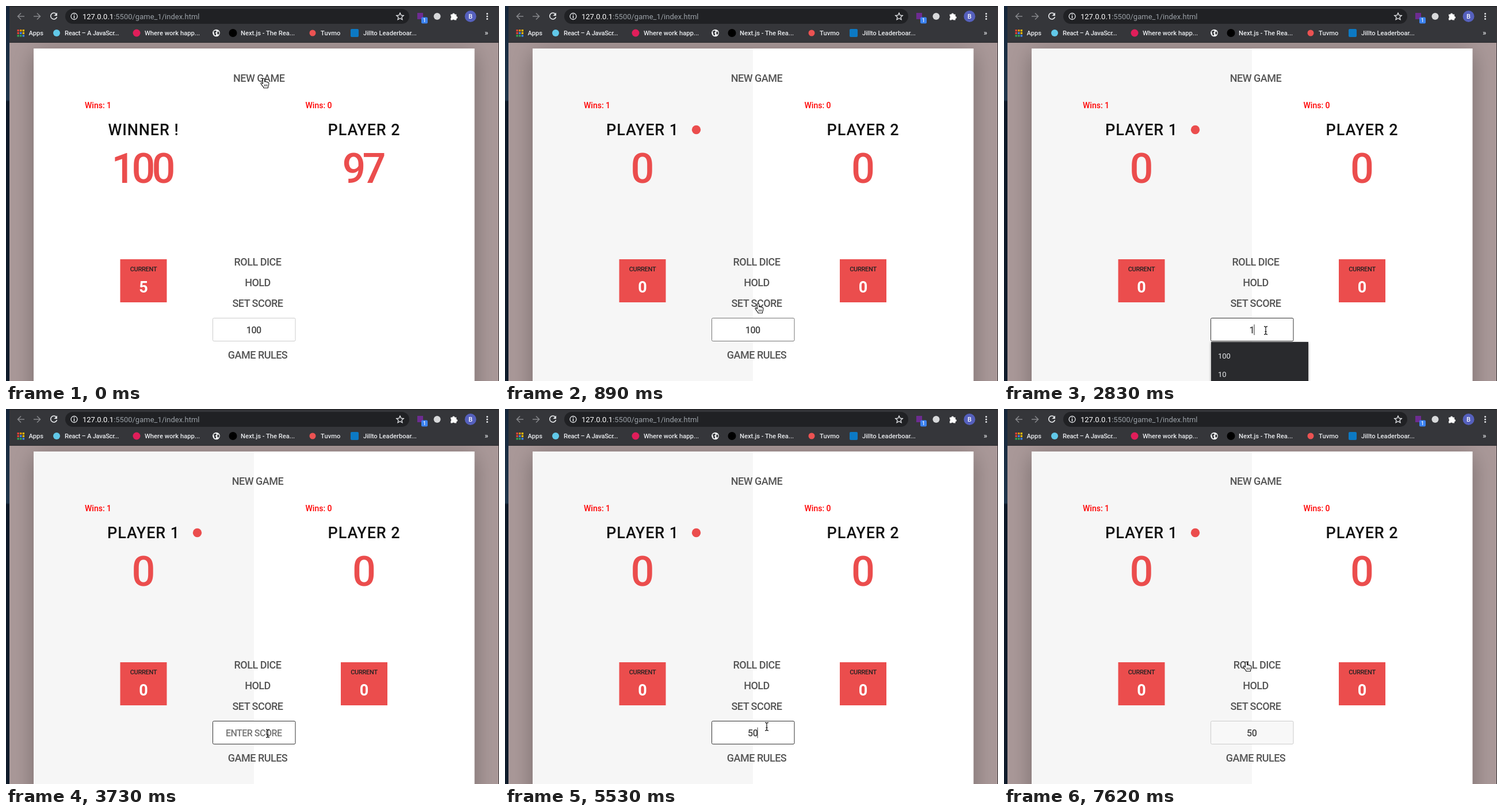
Write an HTML page that moves like this. It is 857x653 px and loops after 8 s.

```html
<!DOCTYPE html>
<html lang="en">
<head>
<meta charset="utf-8">
<title>Dice game</title>
<style>
  html, body { margin: 0; width: 100%; height: 100%; overflow: hidden; }
  svg { display: block; font-family: Roboto, Arial, sans-serif; }
  .card { fill: #fff; filter: drop-shadow(0 8px 19px rgba(0, 0, 0, .3)); }
  .mid, .btn, .name, .score, .label, .cur, #value { text-anchor: middle; font-weight: 500; }
  .btn { font-size: 18px; letter-spacing: -.5px; fill: #555; }
  .wins { font-size: 14px; font-weight: 500; fill: #f00; }
  .name { font-size: 27px; letter-spacing: .9px; fill: #111; }
  .score { font-size: 72px; letter-spacing: -6px; fill: #eb4d4d; }
  .label { font-size: 11px; letter-spacing: -.3px; fill: #222; }
  .cur { font-size: 27px; font-weight: 700; fill: #fff; }
  .red { fill: #eb4d4d; }
  #value { font-size: 16px; letter-spacing: -.5px; }
  .marks { font-size: 11.2px; font-weight: 500; fill: #e8eaed; }
  .line { fill: none; stroke: #e8eaed; stroke-width: 1.6; }
  .thin { stroke-width: 1.3; }
  .dim { stroke: #85868a; }
  .item { font-size: 13px; fill: #e8eaed; }
</style>
</head>
<body>
<svg width="857" height="653" viewBox="0 0 857 653">
  <defs>
    <linearGradient id="desk" x2="0" y2="1">
      <stop offset="0" stop-color="#15263a"/>
      <stop offset=".25" stop-color="#20364c"/>
      <stop offset=".255" stop-color="#0d1827"/>
      <stop offset="1" stop-color="#101c2b"/>
    </linearGradient>
  </defs>

  <!-- page -->
  <rect width="857" height="653" fill="#aa9999"/>
  <rect class="card" x="48" y="74" width="766.5" height="640"/>
  <rect id="active" x="48" y="74" width="383" height="579" fill="#f6f6f6"/>

  <!-- browser -->
  <rect width="857" height="64" fill="#35363a"/>
  <path d="M6 0H857V1.5H6z" fill="#222326"/>
  <path d="M6 63.5H857" stroke="#2a2a2d"/>
  <rect width="6" height="653" fill="url(#desk)"/>
  <path d="M856.5 0V653" stroke="#3a3538"/>
  <rect x="103" y="5" width="598" height="26" rx="13" fill="#202124"/>
  <path class="line dim" d="M32 18H20.5M26 12.5L20.5 18L26 23.5M48 18H59.5M54 12.5L59.5 18L54 23.5"/>
  <path class="line" d="M87.5 14A5.5 5.5 0 1 0 88.5 19"/>
  <path d="M89 11.5V17H83.5z" fill="#e8eaed"/>
  <circle class="line thin" cx="118.5" cy="18" r="5.5"/>
  <path class="line" d="M118.5 17V21.5M118.5 14.5V16"/>
  <text x="133" y="22.5" font-size="13" fill="#fff">127.0.0.1<tspan fill="#9aa0a6">:5500/game_1/index.html</tspan></text>
  <path class="line thin" d="M685 12l1.8 4.1 4.4.4-3.3 2.9 1 4.3-3.9-2.3-3.9 2.3 1-4.3-3.3-2.9 4.4-.4z"/>
  <rect x="715" y="12" width="10" height="11" fill="#6d2c91"/>
  <rect x="722" y="19.5" width="11" height="11" rx="2" fill="#3b82f0"/>
  <text class="mid" x="727.5" y="28.3" font-size="8.5" fill="#fff">1</text>
  <circle cx="749.5" cy="18" r="6" fill="#d8d9db"/>
  <path fill="#fff" d="M773 14.5h3a2 2 0 1 1 4 0h3v3.5a2 2 0 1 1 0 4v2.5h-3.5a2 2 0 0 0-3.5 0h-3v-3.5a2 2 0 0 0 0-3.5z"/>
  <circle cx="807.5" cy="18" r="10" fill="#5560bd"/>
  <text class="mid" x="807.5" y="22" font-size="11" fill="#fff">B</text>
  <path stroke="#e8eaed" stroke-width="3" stroke-linecap="round" d="M836.5 13.5v0M836.5 18v0M836.5 22.5v0"/>

  <g id="apps"></g>
  <circle cx="88" cy="47" r="6" fill="#61c8e8"/>
  <circle cx="227" cy="47" r="6.5" fill="#e01e5a"/>
  <circle cx="365.5" cy="47" r="6.3" fill="#f1f3f4"/>
  <path fill="#35363a" d="M361 44l4-1.5 1 2-2.5 2.5 2 1.5-1 3-2-1zM368 44l2.5 1.5v3l-2 1.5-1.5-2.5z"/>
  <circle cx="394.5" cy="47" r="7" fill="#000"/>
  <circle cx="533" cy="47" r="5.5" fill="#ec5252"/>
  <rect x="599" y="40" width="14" height="14" rx="2" fill="#0c79c4"/>
  <g class="marks">
    <text x="39.5" y="51">Apps</text>
    <text x="102" y="51" letter-spacing="-.3">React – A JavaScr...</text>
    <text x="241" y="51">Where work happ...</text>
    <text x="408" y="51">Next.js - The Rea...</text>
    <text x="547" y="51">Tuvmo</text>
    <text x="621" y="51">Jillto Leaderboar...</text>
    <text x="832" y="51" font-size="13">»</text>
  </g>

  <!-- players -->
  <text class="wins" x="137" y="178">Wins: 1</text>
  <text class="wins" x="520.5" y="178">Wins: 0</text>
  <text class="name" id="name1" x="239" y="224.5"></text>
  <text class="name" x="622.5" y="224.5">PLAYER 2</text>
  <circle class="red" id="dot" cx="332.5" cy="215.5" r="7.7"/>
  <text class="score" id="score1" x="236" y="307.5"></text>
  <text class="score" id="score2" x="619.5" y="307.5"></text>
  <g>
    <path class="red" d="M198.5 441h81v75h-81z"/>
    <text class="label" x="239" y="462">CURRENT</text>
    <text class="cur" id="cur1" x="239" y="498.5"></text>
  </g>
  <g id="box2">
    <path class="red" d="M582 441h81v75h-81z"/>
    <text class="label" x="622.5" y="462">CURRENT</text>
    <text class="cur" x="622.5" y="498.5">0</text>
  </g>

  <!-- controls -->
  <text class="btn" id="newGame" x="437.5" y="131.5">NEW GAME</text>
  <text class="btn" id="roll" x="437.5" y="452">ROLL DICE</text>
  <text class="btn" x="437.5" y="488">HOLD</text>
  <text class="btn" id="setScore" x="437.5" y="524">SET SCORE</text>
  <text class="btn" x="437.5" y="614">GAME RULES</text>
  <rect id="field" x="359.5" y="543.5" width="143.5" height="40" rx="2"/>
  <text id="value" x="430.7" y="569.5"></text>
  <path id="caret" d="M.5 554.5V573" stroke="#333"/>
  <g id="popup" style="filter:drop-shadow(0 1px 2px rgba(0,0,0,.4))">
    <rect id="list" x="360" y="585" width="169" fill="#292a2d"/>
    <text class="item" id="item1" x="372" y="614"></text>
    <text class="item" id="item2" x="372" y="646"></text>
  </g>

  <!-- pointers, each with its hot spot at 0,0 -->
  <g id="pointer">
    <g id="hand">
      <path fill="#fff" stroke="#111" stroke-width="1.1" stroke-linejoin="round" d="M0 0c1.2 0 1.6.9 1.6 2v4c.5-.9 2.6-.8 2.8.4.7-.7 2.4-.4 2.5.8.8-.4 2 0 2 1.3 0 2.4 0 4.2-1.2 6l-.3 2.3H0l-.5-1.8C-2.4 13.5-3.8 11-4.8 9.3c-.8-1.5.8-2.4 2-1.2l1.2 1.3V2C-1.6.9-1.2 0 0 0z"/>
      <path stroke="#111" stroke-width=".9" d="M1.5 10.5v3.5M3.7 10.5v3.5M5.9 10.5v3.5"/>
    </g>
    <path id="arrow" fill="#111" stroke="#fff" stroke-width=".9" d="M0 0v11.5l2.7-2.5 1.8 4.2 2-.9-1.8-4.1h3.7z"/>
    <path id="beam" fill="none" stroke="#222" stroke-width="1.3" d="M-3-7q2.5 0 3 1.5 .5-1.5 3-1.5M-3 7q2.5 0 3-1.5 .5 1.5 3 1.5M0-6V6M-1.5 2h3"/>
  </g>
</svg>
<script>
const LOOP = 8000;
const $ = id => document.getElementById(id);
const show = (id, on) => $(id).style.display = on ? '' : 'none';
const within = (t, ...spans) => spans.some(([a, b]) => t >= a && t < b);
const latest = (keys, t) => keys.filter(k => k[0] <= t).pop();

// time, shape, x, y
const moves = [
  [0, 'hand', 448, 126], [300, 'arrow', 450, 152], [450, 'arrow', 452, 270],
  [600, 'arrow', 446, 425], [740, 'hand', 438, 598], [890, 'hand', 440, 518],
  [1040, 'hand', 441, 518], [1190, 'hand', 442, 520], [1330, 'beam', 455, 565],
  [5080, 'beam', 455, 563], [5230, 'beam', 455, 560], [5380, 'beam', 455, 557],
  [5530, 'beam', 455, 553], [5680, 'beam', 454, 545], [5830, 'beam', 448, 535],
  [5980, 'hand', 440, 519], [6130, 'hand', 436, 517], [6280, 'hand', 433, 516],
  [6870, 'arrow', 422, 486], [7020, 'arrow', 422, 470], [7170, 'hand', 421, 444],
  [7320, 'hand', 421, 441], [7620, 'hand', 421, 440]
];
// time, typed text, caret x
const typing = [
  [0, '100', 443], [2680, '10', 439], [2830, '1', 435],
  [3730, '', 431], [4180, '5', 435], [4480, '50', 439]
];

const colors = ['#ea4335', '#f29900', '#fbbc04', '#ea4335', '#4285f4', '#fbbc04', '#34a853', '#34a853', '#4285f4'];
$('apps').innerHTML = colors.map((c, i) =>
  `<rect x="${19.5 + i % 3 * 4.6}" y="${41 + (i / 3 | 0) * 4.6}" width="3.3" height="3.3" fill="${c}"/>`).join('');

function draw(t) {
  const fresh = t >= 150;
  show('active', fresh);
  show('dot', fresh);
  show('box2', fresh);
  $('name1').textContent = fresh ? 'PLAYER 1' : 'WINNER !';
  $('score1').textContent = fresh ? 0 : 100;
  $('score2').textContent = fresh ? 0 : 97;
  $('cur1').textContent = fresh ? 0 : 5;

  // a pressed button sits slightly to the right
  const press = (id, on) => $(id).setAttribute('x', on ? 439.7 : 437.5);
  press('newGame', t < 300);
  press('setScore', within(t, [6130, 7320]));
  press('roll', t >= 7320);

  const locked = t >= 6280;
  const focused = within(t, [1780, 6130]);
  const [, text, caretX] = latest(typing, t);
  $('field').setAttribute('fill', locked ? '#f8f8f8' : '#fff');
  $('field').setAttribute('stroke', locked || !fresh ? '#ccc' : focused ? '#333' : '#767676');
  $('value').textContent = text || 'ENTER SCORE';
  $('value').setAttribute('fill', text ? '#444' : '#757575');
  show('caret', within(t, [1930, 2380], [2680, 3280], [3880, 4930], [5380, 5830]));
  $('caret').setAttribute('transform', `translate(${caretX - .5})`);

  const two = within(t, [2680, 3730]);
  show('popup', two || within(t, [4180, 4480]));
  $('list').setAttribute('height', two ? 80 : 48);
  $('item1').textContent = two ? '100' : '50';
  $('item2').textContent = two ? '10' : '';

  const [, shape, x, y] = latest(moves, t);
  for (const s of ['hand', 'arrow', 'beam']) show(s, s === shape);
  $('pointer').setAttribute('transform', `translate(${x} ${y})`);
}

const start = performance.now();
function tick() {
  draw((performance.now() - start) % LOOP);
  requestAnimationFrame(tick);
}
tick();
</script>
</body>
</html>
```
